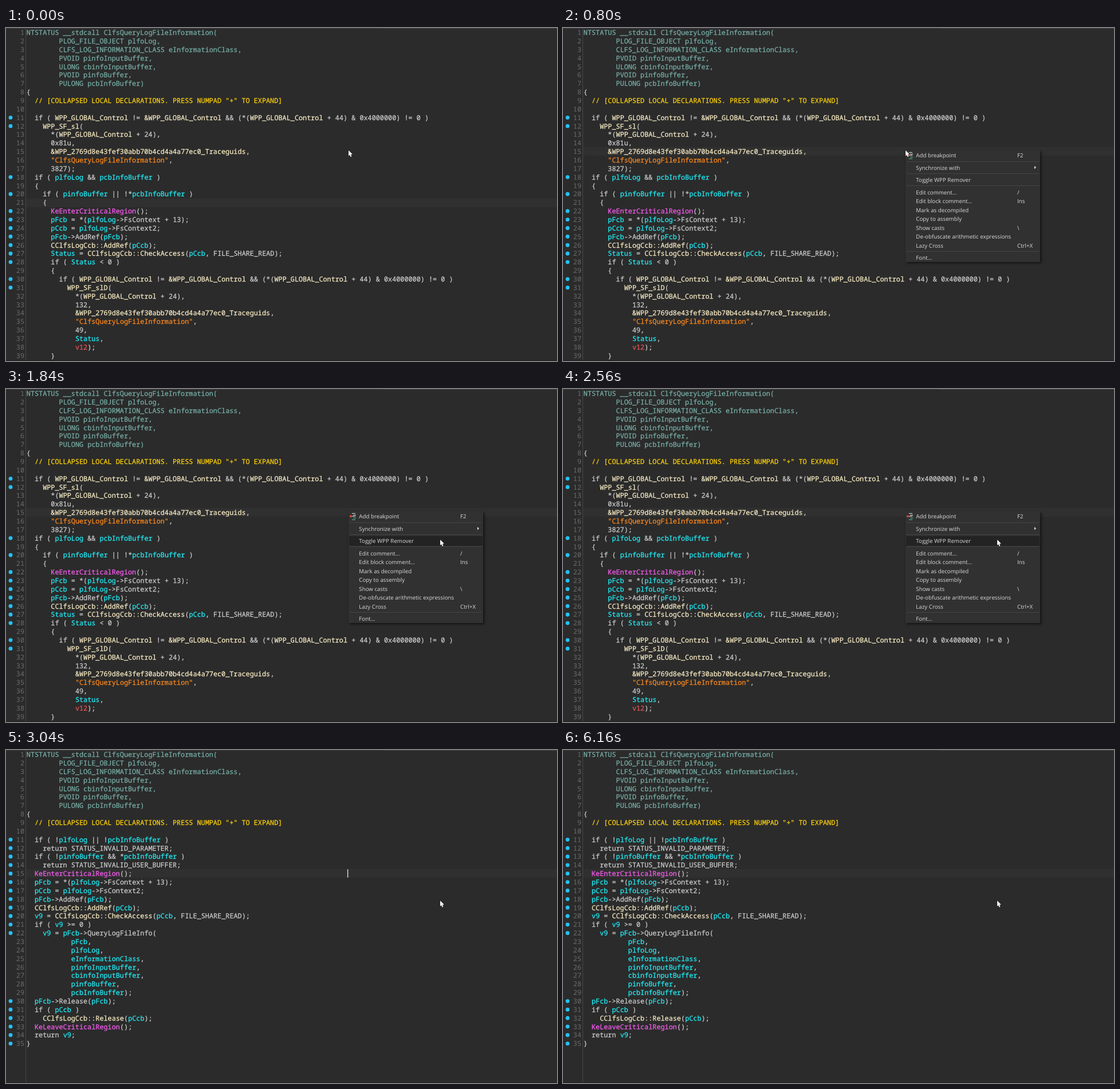
An HTML page with a canvas for the animation above (6.24 s loop, 962 px wide and 582 px high).

```html
<!DOCTYPE html>
<html lang="en">
<head>
<meta charset="utf-8">
<title>Decompiler view</title>
<style>
html, body { margin: 0; width: 100%; height: 100%; overflow: hidden; background: #2b2b2b; }
canvas { display: block; }
</style>
</head>
<body>
<canvas id="stage" width="962" height="582"></canvas>
<script>
const ctx = document.getElementById('stage').getContext('2d');
const W = 962, H = 582, LOOP = 6240, STEP = 80;
const CHAR = 7.093, ROW = 14.855, LEFT = 35.8, FIRST = 8;
const CODE_FONT = '11.82px "Noto Sans Mono", monospace';
const MENU_FONT = '9.75px "Open Sans", sans-serif';
const MENU_OPEN = 240, MENU_FADE = 240, CODE_SWAP = 2640;

const COLOR = {
  bg: '#2b2b2b', row: '#303030', number: '#6c6c6c', dot: '#27c1f7',
  plain: '#cecece', proto: '#78b0a8', note: '#ffd20a', global: '#fbeec6',
  local: '#20f0fa', call: '#fa5cf2', string: '#ff8a1f', bad: '#ec5555'
};

const HEAD = `NTSTATUS __stdcall ClfsQueryLogFileInformation(
        PLOG_FILE_OBJECT plfoLog,
        CLFS_LOG_INFORMATION_CLASS eInformationClass,
        PVOID pinfoInputBuffer,
        ULONG cbinfoInputBuffer,
        PVOID pinfoBuffer,
        PULONG pcbInfoBuffer)
{
  // [COLLAPSED LOCAL DECLARATIONS. PRESS NUMPAD "+" TO EXPAND]

`;

const BEFORE = HEAD + `  if ( WPP_GLOBAL_Control != &WPP_GLOBAL_Control && (*(WPP_GLOBAL_Control + 44) & 0x4000000) != 0 )
    WPP_SF_sl(
      *(WPP_GLOBAL_Control + 24),
      0x81u,
      &WPP_2769d8e43fef30abb70b4cd4a4a77ec0_Traceguids,
      "ClfsQueryLogFileInformation",
      3827);
  if ( plfoLog && pcbInfoBuffer )
  {
    if ( pinfoBuffer || !*pcbInfoBuffer )
    {
      KeEnterCriticalRegion();
      pFcb = *(plfoLog->FsContext + 13);
      pCcb = plfoLog->FsContext2;
      pFcb->AddRef(pFcb);
      CClfsLogCcb::AddRef(pCcb);
      Status = CClfsLogCcb::CheckAccess(pCcb, FILE_SHARE_READ);
      if ( Status < 0 )
      {
        if ( WPP_GLOBAL_Control != &WPP_GLOBAL_Control && (*(WPP_GLOBAL_Control + 44) & 0x4000000) != 0 )
          WPP_SF_slD(
            *(WPP_GLOBAL_Control + 24),
            132,
            &WPP_2769d8e43fef30abb70b4cd4a4a77ec0_Traceguids,
            "ClfsQueryLogFileInformation",
            49,
            Status,
            v12);
      }`;

const AFTER = HEAD + `  if ( !plfoLog || !pcbInfoBuffer )
    return STATUS_INVALID_PARAMETER;
  if ( !pinfoBuffer && *pcbInfoBuffer )
    return STATUS_INVALID_USER_BUFFER;
  KeEnterCriticalRegion();
  pFcb = *(plfoLog->FsContext + 13);
  pCcb = plfoLog->FsContext2;
  pFcb->AddRef(pFcb);
  CClfsLogCcb::AddRef(pCcb);
  v9 = CClfsLogCcb::CheckAccess(pCcb, FILE_SHARE_READ);
  if ( v9 >= 0 )
    v9 = pFcb->QueryLogFileInfo(
           pFcb,
           plfoLog,
           eInformationClass,
           pinfoInputBuffer,
           cbinfoInputBuffer,
           pinfoBuffer,
           pcbInfoBuffer);
  pFcb->Release(pFcb);
  if ( pCcb )
    CClfsLogCcb::Release(pCcb);
  KeLeaveCriticalRegion();
  return v9;
}`;

const RULES = [
  [/^"/, 'string'],
  [/^&?WPP_|^CClfsLogCcb::/, 'global'],
  [/^Ke[A-Z]/, 'call'],
  [/^v12$/, 'bad'],
  [/^(plfoLog|pcbInfoBuffer|pinfoBuffer|eInformationClass|pinfoInputBuffer|cbinfoInputBuffer|pFcb|pCcb|Status|v9)$/, 'local']
];

// Splits a listing into coloured runs with their columns.
function parse(text, dotRanges) {
  const rows = text.split('\n').map((line, i) => {
    if (i < 7) return [{ col: line.search(/\S/), text: line.trim(), color: COLOR.proto }];
    const pattern = i === 8 ? /\S.*/g : /"[^"]*"|&?\w+(?:::\w+)?|[^\s\w"]+?/g;
    return [...line.matchAll(pattern)].map(m => {
      const rule = RULES.find(([test]) => test.test(m[0]));
      const kind = i === 8 ? 'note' : rule ? rule[1] : 'plain';
      return { col: m.index, text: m[0], color: COLOR[kind] };
    });
  });
  return { rows, hasDot: n => dotRanges.some(([a, b]) => n >= a && n <= b) };
}

const before = parse(BEFORE, [[11, 12], [18, 18], [20, 20], [22, 28], [30, 31]]);
const after = parse(AFTER, [[11, 22], [30, 35]]);

// Label, centre y, shortcut
const MENU = [
  ['Add breakpoint', 222.5, 'F2'],
  ['Synchronize with', 244],
  ['Toggle WPP Remover', 265.5],
  ['Edit comment...', 287, '/'],
  ['Edit block comment...', 302.5, 'Ins'],
  ['Mark as decompiled', 318],
  ['Copy to assembly', 333.5],
  ['Show casts', 349, '\\'],
  ['De-obfuscate arithmetic expressions', 364.5],
  ['Lazy Cross', 380, 'Ctrl+X'],
  ['Font...', 401]
];

// Time, x, y of the pointer tip
const PATH = [
  [960, 598, 214], [1040, 602, 215], [1360, 709, 234.5],
  [1600, 752, 260], [1840, 758, 263.5]
];

const CARET_ON = [[CODE_SWAP, 3120], [3600, 4080], [4640, 5120], [5600, 6080]];

const rowY = n => FIRST + (n - 1) * ROW;

function rect(x, y, w, h, color) {
  ctx.fillStyle = color;
  ctx.fillRect(x, y, w, h);
}

function polygon(points, color) {
  ctx.beginPath();
  points.forEach(([x, y]) => ctx.lineTo(x, y));
  ctx.closePath();
  ctx.fillStyle = color;
  ctx.fill();
}

function circle(x, y, r, color) {
  ctx.beginPath();
  ctx.arc(x, y, r, 0, Math.PI * 2);
  ctx.fillStyle = color;
  ctx.fill();
}

// A hairline stroke gives the text a slightly heavier weight.
function label(text, x, y, color, weight = 0) {
  ctx.fillStyle = ctx.strokeStyle = color;
  ctx.fillText(text, x, y);
  if (!weight) return;
  ctx.lineWidth = weight;
  ctx.strokeText(text, x, y);
}

function pointerAt(t) {
  const last = PATH[PATH.length - 1];
  if (t <= PATH[0][0]) return PATH[0].slice(1);
  if (t >= last[0]) return last.slice(1);
  const i = PATH.findIndex(p => p[0] > t);
  const [t0, x0, y0] = PATH[i - 1], [t1, x1, y1] = PATH[i];
  const k = (t - t0) / (t1 - t0);
  return [x0 + (x1 - x0) * k, y0 + (y1 - y0) * k];
}

function drawCode(code, current) {
  rect(0, 0, W, H, COLOR.bg);
  rect(35, Math.round(rowY(current) - 7.5), W - 35, 15, COLOR.row);
  rect(34, 0, 1, H, '#474747');
  rect(0, 0, 657, 1, '#3d3d3d');
  rect(657, 0, W - 657, 1, '#4a4a4a');
  rect(0, H - 1, W, 1, '#202020');
  ctx.font = CODE_FONT;
  code.rows.forEach((runs, i) => {
    const n = i + 1, base = rowY(n) + 4.2;
    ctx.textAlign = 'right';
    label(n, 32, base, COLOR.number);
    ctx.textAlign = 'left';
    if (code.hasDot(n)) circle(8, rowY(n), 3.4, COLOR.dot);
    for (const run of runs) label(run.text, LEFT + run.col * CHAR, base, run.color, 0.25);
  });
}

function drawMenu(alpha, x, y) {
  ctx.save();
  ctx.globalAlpha = alpha;
  ctx.shadowColor = 'rgba(0,0,0,.6)';
  ctx.shadowBlur = 4;
  ctx.shadowOffsetX = ctx.shadowOffsetY = 2;
  rect(598, 214, 235, 195, '#313131');
  ctx.shadowColor = 'transparent';
  for (const line of [233, 254, 275, 390]) rect(600, line, 231, 1, '#454545');
  const hovered = x > 600 && MENU.find(item => Math.abs(item[1] - y) < 8.5);
  if (hovered) rect(599, hovered[1] - 8.5, 233, 17, '#232323');

  ctx.font = MENU_FONT;
  for (const [name, mid, key] of MENU) {
    label(name, 616.3, mid + 3.5, '#dadada');
    if (key) label(key, 793, mid + 3.5, '#dadada');
  }
  polygon([[823, 241], [826, 243.7], [823, 246.4]], '#dcdcdc');

  circle(602, 222.5, 1.9, '#e04a3f');
  [217, 220, 222, 225, 228].forEach((line, i) =>
    rect(i % 2 ? 606 : 604, line, i % 2 ? 5 : 6, 1, i > 2 ? '#55c49a' : '#e4e4e4'));
  ctx.restore();
}

function drawPointer(x, y) {
  ctx.save();
  ctx.translate(x, y);
  ctx.lineWidth = 1;
  ctx.lineJoin = 'round';
  ctx.strokeStyle = 'rgba(16,16,16,.6)';
  polygon([[0.2, 0], [0.2, 9.6], [2.3, 7.7], [3.8, 11.3], [5.4, 10.6], [3.9, 7.1], [6.8, 6.8]], '#fff');
  ctx.stroke();
  ctx.fill();
  ctx.restore();
}

function draw(t) {
  const [x, y] = pointerAt(t);
  const swapped = t >= CODE_SWAP;
  drawCode(swapped ? after : before, t < MENU_OPEN ? 21 : 15);
  if (t >= MENU_OPEN && !swapped) drawMenu(Math.min(1, (t - MENU_OPEN + STEP) / MENU_FADE), x, y);
  if (CARET_ON.some(([a, b]) => t >= a && t < b)) rect(596, 208.5, 1.3, 14.5, '#e6e6e6');
  drawPointer(x, y);
}

ctx.textBaseline = 'alphabetic';
ctx.textRendering = 'geometricPrecision';
const start = performance.now();
function tick() {
  const t = Math.max(0, performance.now() - start) % LOOP;
  draw(Math.floor(t / STEP) * STEP);
  requestAnimationFrame(tick);
}
tick();
</script>
</body>
</html>
```
